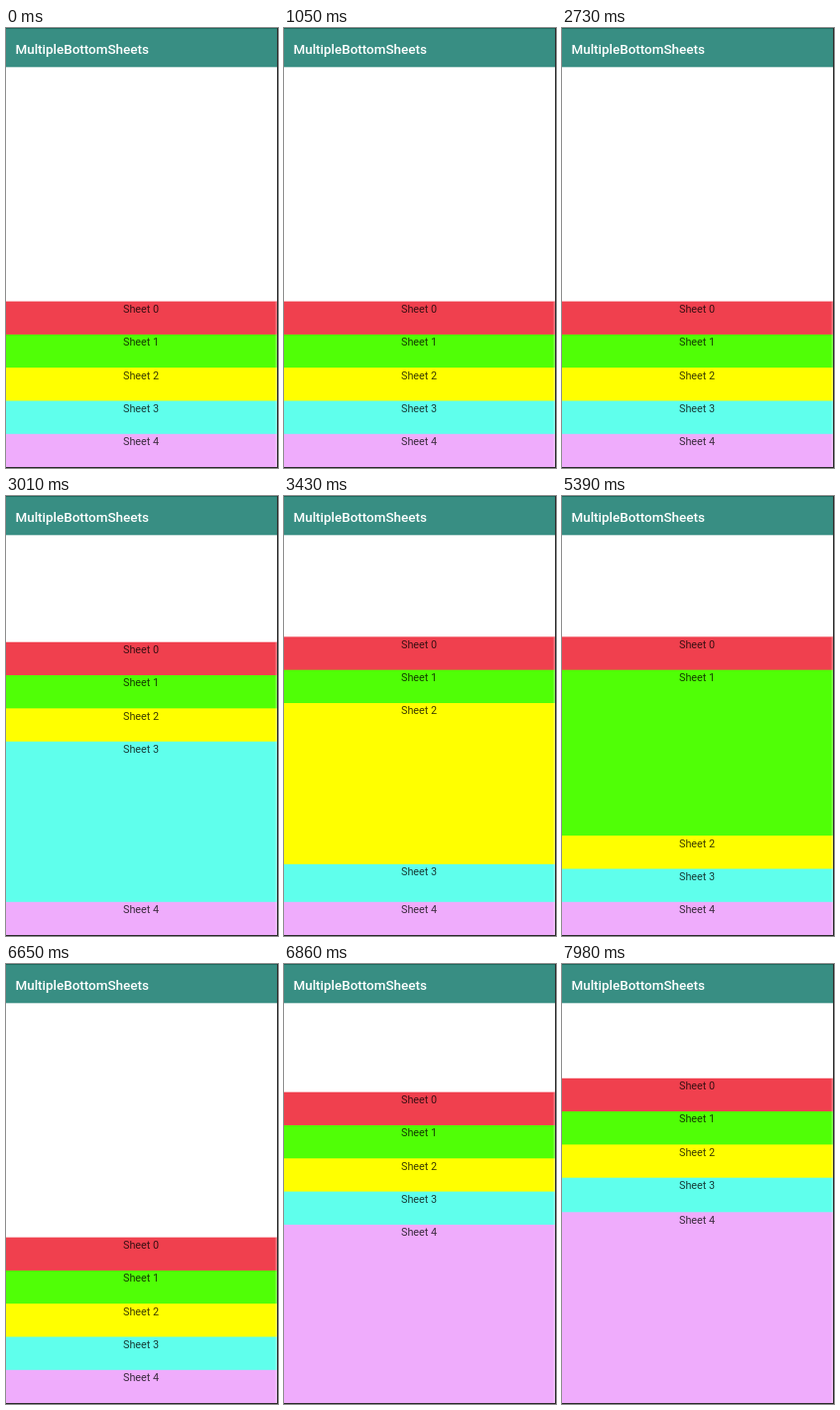
These frames come from a looping animation (274x442 px, 8 s). An HTML page with a canvas:

```html
<!DOCTYPE html>
<html lang="en">
<head>
<meta charset="utf-8">
<title>Bottom sheets</title>
<style>
  html, body { margin: 0; width: 100%; height: 100%; overflow: hidden; background: #fff; }
  canvas { display: block; }
</style>
</head>
<body>
<canvas id="stage" width="274" height="442"></canvas>
<script>
const ctx = document.getElementById('stage').getContext('2d');
const LOOP = 8000, STEP = 70, SETTLE = 512;
const PEEK = 33.3, FIRST_TOP = 274.6;
const colors = ['#f0404e', '#50ff06', '#ffff00', '#5fffec', '#efacfc'];

// [start ms, sheet, height change in peek heights]
const moves = [
  [2767, 3, 4],
  [3180, 3, -4], [3180, 2, 4],
  [4364, 2, -4], [4364, 1, 4],
  [5425, 1, -4],
  [6685, 4, 5],
  [7975, 4, -5], [7979, 3, 4]
];

const clamp = x => Math.min(1, Math.max(0, x));
const easeOut = x => 1 - (1 - clamp(x)) ** 5;

function rect(color, x, y, w, h) {
  ctx.fillStyle = color;
  ctx.fillRect(x, y, w, h);
}

function text(str, font, color, align, x, y) {
  ctx.font = font + ' Roboto, sans-serif';
  ctx.fillStyle = color;
  ctx.textAlign = align;
  ctx.fillText(str, x, y);
}

function draw(t) {
  const heights = colors.map(() => PEEK);
  for (const [start, sheet, change] of moves) {
    heights[sheet] += change * PEEK * easeOut((t - start) / SETTLE);
  }

  rect('#fff', 0, 0, 274, 442);
  rect('#388e83', 0, 0, 274, 39.3);
  rect('#1f6b60', 0, 0, 274, 1);
  text('MultipleBottomSheets', '500 13.45px', '#fff', 'left', 9.4, 26);

  // Stacked from the bottom up, each sheet reaching down behind the next
  let top = FIRST_TOP + colors.length * PEEK;
  const tops = [];
  for (let i = colors.length - 1; i >= 0; i--) tops[i] = top -= heights[i];
  tops.forEach((y, i) => {
    rect(colors[i], 0, y, 274, 442 - y);
    text('Sheet ' + i, '10.75px', 'rgba(0,0,0,.77)', 'center', 136, y + 11.3);
  });

  // Soft light rim beside the dark right and bottom edges
  rect('rgba(255,255,255,.3)', 271.5, tops[0], 1.5, 442);
  rect('#2b2b2b', 273, 0, 1, 442);
  rect('#2b2b2b', 0, 441, 274, 1);
}

function frame() {
  const t = performance.now() % LOOP;
  draw(Math.floor(t / STEP) * STEP);
  requestAnimationFrame(frame);
}
frame();
</script>
</body>
</html>
```
